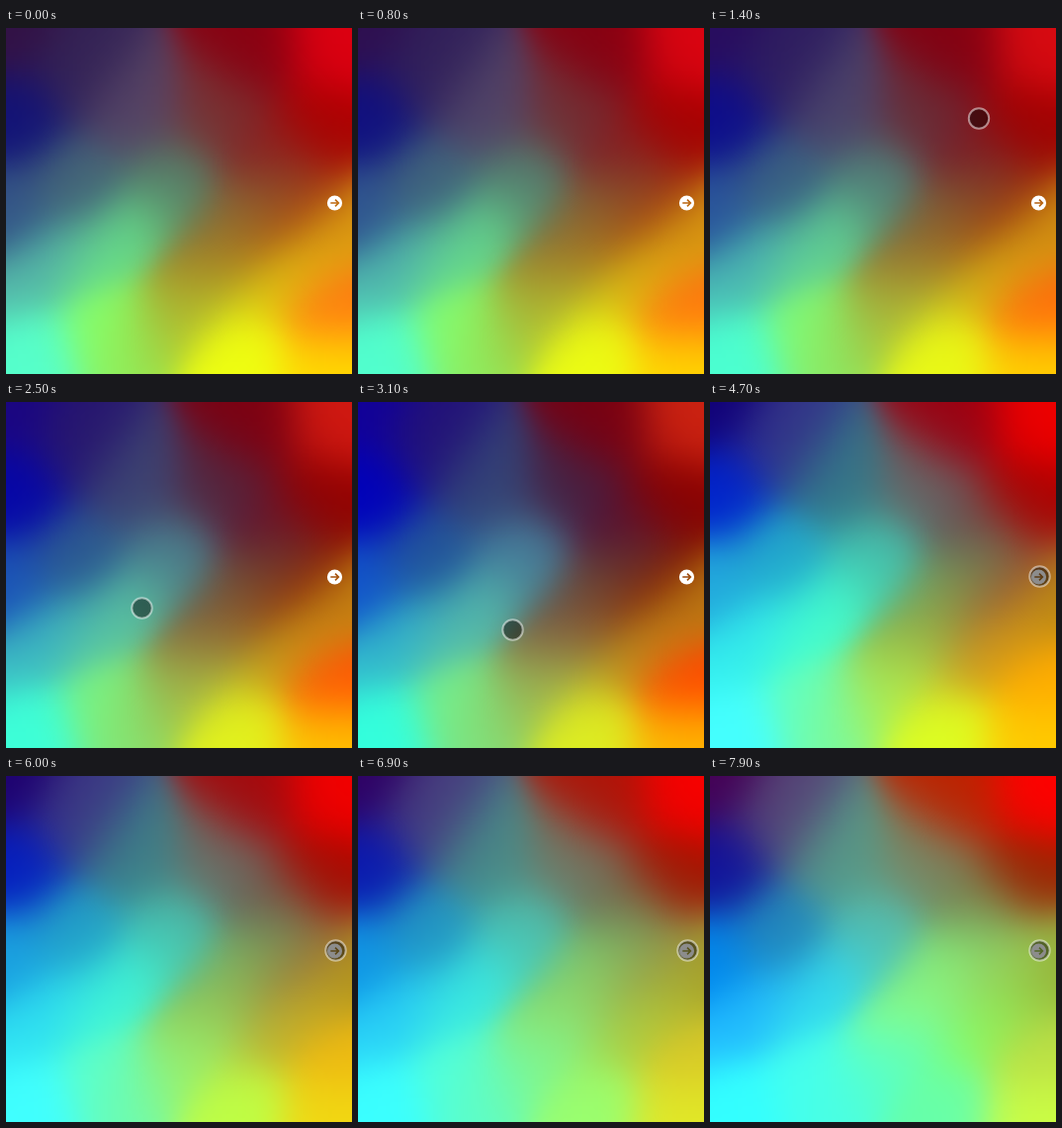
An HTML page with a canvas that plays this animation: 350x350 px, repeating every 8000 ms.

```html
<!DOCTYPE html>
<html lang="en">
<head>
<meta charset="utf-8">
<title>Flowing gradient</title>
<style>
html, body { margin: 0; width: 100%; height: 100%; overflow: hidden; background: #000; }
canvas, svg { position: absolute; left: 0; top: 0; width: 350px; height: 350px; display: block; }
</style>
</head>
<body>
<canvas id="field" width="350" height="350"></canvas>
<svg viewBox="0 0 350 350">
  <mask id="cutout">
    <circle cx="332.5" cy="177" r="7.6" fill="#fff"/>
    <path d="M328.3 177H336.2M333 173.6L336.4 177L333 180.4" fill="none" stroke="#000" stroke-width="1.6"/>
  </mask>
  <rect x="324" y="168" width="17" height="18" fill="#fff" mask="url(#cutout)"/>
  <circle id="cursor" r="10.2" fill="#000" fill-opacity=".45" stroke="#fff" stroke-opacity=".5" stroke-width="2"/>
</svg>
<script>
const LOOP = 8000, STEP = 100, SIZE = 350, N = 88, CELL = SIZE / N;
const poseTimes = [0, 3100, 4700, 7900];

// Each spot: x, y and its colour in every pose.
const roundSpots = [
  [0, 0, '314 109 107 405'],
  [10, 95, '117 00b 02c 119'],
  [75, 40, '325 217 338 547'],
  [0, 190, '358 15c 2ad 08e'],
  [130, 80, '546 347 378 598'],
  [70, 160, '467 259 2ac 28b'],
  [215, 85, '733 424 666 786'],
  [250, 25, '801 701 901 b20'],
  [335, 20, 'd01 c21 e00 f00'],
  [320, 100, 'a00 800 a00 920'],
  [265, 135, '822 513 655 785'],
  [170, 160, '576 479 4ba 5ba'],
  [20, 335, '5fc 3fd 4ff 3ff'],
  [110, 310, '8f6 7e8 6fb 4fe'],
  [330, 280, 'f71 f40 fa0 bd4'],
  [235, 330, 'ef1 de2 df2 6fa'],
  [330, 345, 'fd0 fb0 fc0 cf4']
];
const slantedSpots = [
  [240, 185, '863 643 795 8e7'],
  [115, 215, '6d8 5ba 4fc 3de'],
  [30, 245, '5ba 3bc 3ee 2bf'],
  [215, 235, 'a82 864 9b4 8f8'],
  [290, 195, 'a41 820 953 9c5'],
  [345, 205, 'd91 b71 b81 9a3'],
  [175, 290, 'ab3 9b5 ae5 5fc'],
  [280, 250, 'dc1 b92 c92 8f6']
];

const rgb = hex => [...hex].map(c => parseInt(c, 16) * 17);
const mix = (a, b, k) => a + (b - a) * k;
const makeSpot = (along, across) => ([x, y, colours]) =>
  ({ x, y, along, across, poses: colours.split(' ').map(rgb) });
const spots = [...roundSpots.map(makeSpot(33, 33)), ...slantedSpots.map(makeSpot(46, 25))];

function influence(spot, x, y) {
  const dx = x - spot.x, dy = y - spot.y;
  const u = (dx * 0.8 - dy * 0.6) / spot.along;
  const v = (dx * 0.6 + dy * 0.8) / spot.across;
  return Math.exp(-(u * u + v * v) / 2);
}

const weights = new Float32Array(N * N * spots.length);
for (let i = 0; i < N * N; i++) {
  const x = (i % N + 0.5) * CELL, y = (Math.floor(i / N) + 0.5) * CELL;
  const row = spots.map(s => influence(s, x, y));
  const sum = row.reduce((a, b) => a + b, 0);
  weights.set(row.map(w => w / sum), i * spots.length);
}

const small = document.createElement('canvas');
small.width = small.height = N;
const smallCtx = small.getContext('2d');
const image = smallCtx.createImageData(N, N);
const ctx = document.getElementById('field').getContext('2d');
ctx.imageSmoothingQuality = 'high';

function segment(times, t) {
  let i = 0;
  while (i < times.length - 2 && t >= times[i + 1]) i++;
  const k = (t - times[i]) / (times[i + 1] - times[i]);
  return [i, Math.max(0, Math.min(1, k))];
}

function drawField(t) {
  const [i, k] = segment(poseTimes, t);
  const eased = Math.pow(k, 1.5);
  const colours = spots.map(s => s.poses[i].map((c, n) => mix(c, s.poses[i + 1][n], eased)));
  for (let p = 0, w = 0; p < N * N; p++) {
    let r = 0, g = 0, b = 0;
    for (const c of colours) {
      const a = weights[w++];
      r += a * c[0]; g += a * c[1]; b += a * c[2];
    }
    image.data.set([r, g, b, 255], p * 4);
  }
  smallCtx.putImageData(image, 0, 0);
  ctx.drawImage(small, 0, 0, SIZE, SIZE);
}

const cursor = document.getElementById('cursor');
const cursorTimes = [1400, 2500, 3100, 3600, 4500];
const cursorStops = [[272, 91.5], [137.5, 208.5], [156.5, 230.5], [156.5, 230.5], [333.5, 176.5]];

function drawCursor(t) {
  const [i, k] = segment(cursorTimes, t);
  const eased = k * k * (3 - 2 * k);
  const [x, y] = cursorStops[i].map((c, n) => mix(c, cursorStops[i + 1][n], eased));
  cursor.setAttribute('cx', x);
  cursor.setAttribute('cy', y);
  cursor.setAttribute('opacity', Math.max(0, Math.min(1, (t - 800) / 300)));
}

let shown = -1;
function frame(now) {
  const t = Math.floor(((now - start) % LOOP + LOOP) % LOOP / STEP) * STEP;
  if (t !== shown) {
    shown = t;
    drawField(t);
    drawCursor(t);
  }
  requestAnimationFrame(frame);
}
const start = performance.now();
frame(start);
</script>
</body>
</html>
```
